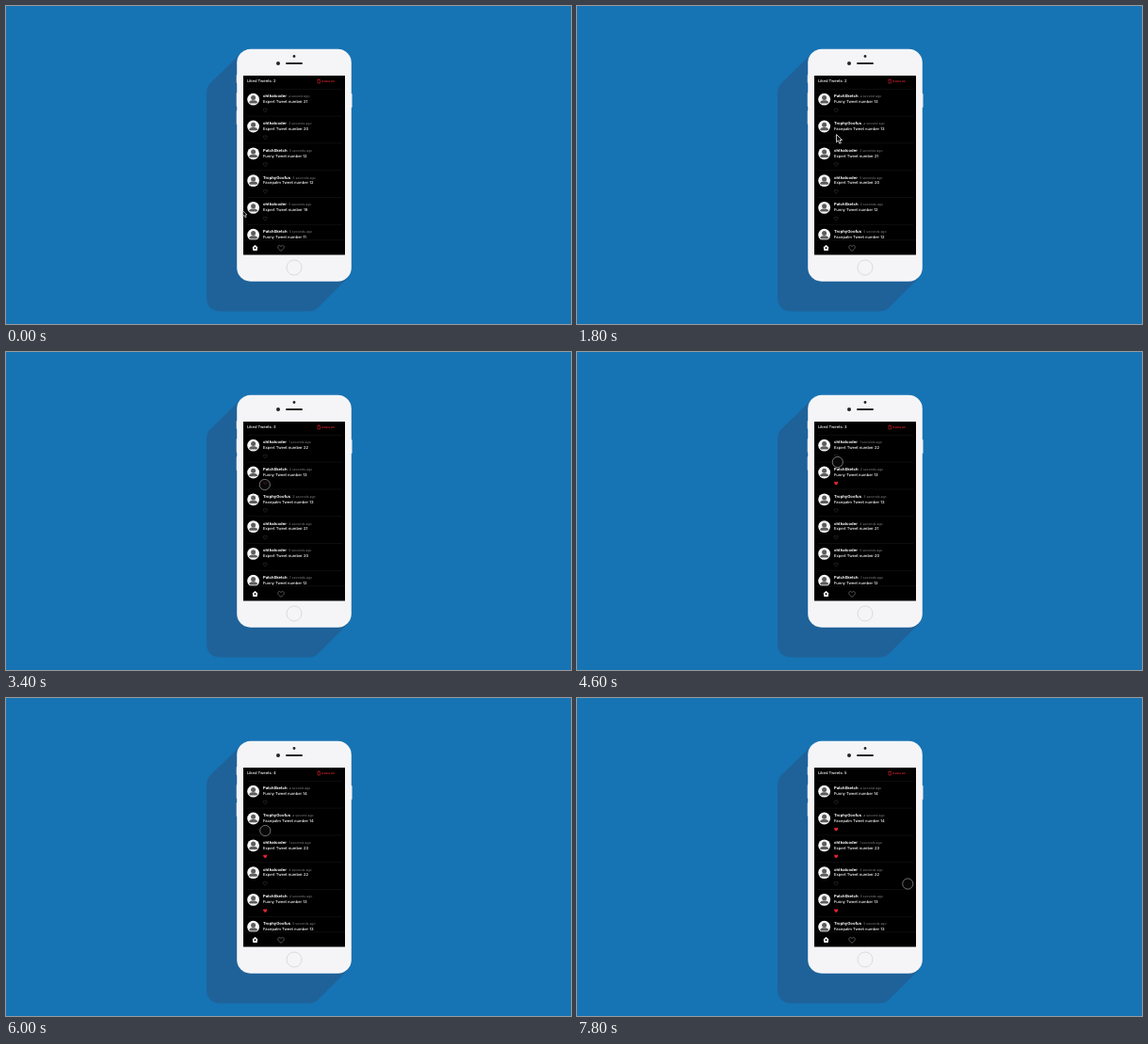
Recreate the animation shown at these times as an HTML page. Size 600 px wide and 338 px high, loop 8 s.

```html
<!DOCTYPE html>
<html lang="en">
<head>
<meta charset="utf-8">
<title>Liked feed on a phone</title>
<style>
  html, body { margin: 0; width: 100%; height: 100%; overflow: hidden; background: #1673b4; }
  svg { display: block; width: 100%; height: 100%; }
  text { font-family: Inter, Roboto, sans-serif; font-size: 4.1px; font-weight: 500; fill: #fff; text-rendering: geometricPrecision; }
  .name { font-weight: 700; font-size: 4.15px; }
  .age { font-weight: 400; font-size: 3.5px; fill: #808080; }
  .delete { font-size: 2.9px; font-weight: 600; fill: #e0242f; }
  .line { stroke: #1c1c1c; stroke-width: .5; }
  .heart { fill: none; stroke: #4c4c4c; stroke-width: .5; }
  .heart.liked { fill: #e0242f; stroke: none; }
</style>
</head>
<body>
<svg viewBox="0 0 600 338">
  <defs>
    <path id="heart" d="M0 2.2C-1.2 1.3 -2.3 .4 -2.3 -.7C-2.3 -2.3 -.6 -2.5 0 -1.2C.6 -2.5 2.3 -2.3 2.3 -.7C2.3 .4 1.2 1.3 0 2.2Z"/>
    <clipPath id="face"><circle r="5.6"/></clipPath>
    <g id="avatar">
      <circle r="6.4" fill="#f5f5f5"/>
      <g clip-path="url(#face)" fill="#5c5c5c">
        <circle cy="-1.7" r="2.5"/>
        <path d="M-4.500 4.200V3.200Q-4.200 1.200 -1.600 1H1.600Q4.200 1.200 4.500 3.200V4.200Z"/>
      </g>
    </g>
    <clipPath id="feedArea"><rect x="252" y="88" width="108" height="160.500"/></clipPath>
    <clipPath id="screenArea"><rect x="252" y="74" width="108" height="190.500"/></clipPath>
  </defs>

  <rect width="600" height="338" fill="#1673b4"/>
  <path fill="#1f6299" d="M250 50L217 82Q213 86 213 93V309Q213 324.500 228 324.500H321Q327 324.500 331 321L363 289Z"/>

  <g fill="#dfe2e6">
    <rect x="244.700" y="73" width="2" height="9" rx=".7"/>
    <rect x="244.700" y="92" width="2" height="15" rx=".7"/>
    <rect x="244.700" y="111" width="2" height="15" rx=".7"/>
    <rect x="365.600" y="93" width="2" height="15" rx=".7"/>
  </g>
  <rect x="245.200" y="45.800" width="121.600" height="246.900" rx="14.500" fill="#f5f5f7"/>
  <g fill="#242424">
    <circle cx="306" cy="53.500" r="1.400"/>
    <circle cx="289" cy="61" r="2"/>
    <rect x="297" y="60" width="18" height="2" rx="1"/>
  </g>
  <circle cx="306" cy="278" r="8" fill="#f5f5f7" stroke="#d9d9dc" stroke-width=".9"/>
  <rect x="252" y="74" width="108" height="190.500"/>

  <text id="total" x="256" y="81.400"></text>
  <path fill="none" stroke="#e0242f" stroke-width=".6" d="M330.500 78.400H333.900M331 78.700V82H333.400V78.700M331.600 77.700H332.800"/>
  <text class="delete" x="335.300" y="81.100">Delete All</text>
  <path class="line" d="M256 88.300H357"/>

  <g id="feed" clip-path="url(#feedArea)"></g>

  <path class="line" d="M252 248.800H360"/>
  <path fill="#fff" d="M264.500 254L267.200 256.200L266.700 260H262.300L261.800 256.200Z"/>
  <circle cx="264.500" cy="257.300" r="1"/>
  <use href="#heart" class="heart" transform="translate(292 257.300) scale(1.400)" style="stroke:#777"/>

  <path id="arrow" d="M0 0V8.300L1.900 6.600L3.300 9.700L4.900 9L3.500 6H6Z" fill="#111" stroke="#eee" stroke-width=".8"/>
  <circle id="touch" r="5.600" fill="#080808" fill-opacity=".85" stroke="#8c8c8c" stroke-width=".8" clip-path="none"/>
</svg>

<script>
const LOOP = 8000, STEP = 200, ROWS = 6, PITCH = 28.8;
const authors = { Funny: "PatchSketch", Facepalm: "TrophyGoofus", Expert: "ohthatcoder" };

// Newest first; each state shows six posts from its offset.
const posts = ["Funny 14", "Facepalm 14", "Expert 23", "Expert 22", "Funny 13", "Facepalm 13",
  "Expert 21", "Expert 20", "Funny 12", "Facepalm 12", "Expert 19", "Funny 11"];
const likes = { "Funny 13": 3200, "Expert 23": 5200, "Facepalm 14": 6600 };

// Start time, offset into posts, age of each row in seconds
const states = [
  [0, 6, "a23355"],
  [800, 5, "a13455"],
  [1600, 4, "aa2555"],
  [2200, 3, "aa1356"],
  [3200, 3, "123457"],
  [4800, 2, "a34568"],
  [5400, 1, "aa3457"],
  [5800, 0, "aa1445"],
  [6600, 0, "aa1455"]
];

// Time, x, y of the pointer
const path = [
  [0, 251.5, 217.5], [400, 251.5, 217.5], [1400, 275, 137], [1800, 275.5, 136.5],
  [2000, 275.3, 142], [2400, 275.3, 143], [3400, 274.8, 141], [3800, 274.8, 141],
  [4600, 276.8, 117], [5000, 275, 111], [5400, 275, 112], [5800, 275.3, 141],
  [7000, 275.3, 141], [7800, 351.3, 197.5]
];
const TOUCH_FROM = 2000;

const byId = id => document.getElementById(id);
const lastBefore = (table, t) => table.filter(row => row[0] <= t).pop();

function pointerAt(t) {
  const a = lastBefore(path, t);
  const b = path[path.indexOf(a) + 1] || a;
  const k = b === a ? 0 : (t - a[0]) / (b[0] - a[0]);
  const eased = k * k * (3 - 2 * k);
  return [1, 2].map(i => a[i] + (b[i] - a[i]) * eased);
}

function row(post, age, index, t) {
  const [kind, number] = post.split(" ");
  const liked = t >= likes[post] ? " liked" : "";
  const ago = age === "a" ? "a second ago" : `${age} seconds ago`;
  return `<g transform="translate(0 ${index * PITCH})">
    <use href="#avatar" x="262.6" y="99.2"/>
    <text class="name" x="273" y="97.2">${authors[kind]}<tspan class="age" dx="2.3">${ago}</tspan></text>
    <text x="273" y="103.1">${kind} Tweet number ${number}</text>
    <use href="#heart" class="heart${liked}" transform="translate(275.2 110.8) scale(.88)"/>
    <path class="line" d="M256 117.1H357"/>
  </g>`;
}

function draw(t) {
  const [, offset, ages] = lastBefore(states, t);
  const visible = posts.slice(offset, offset + ROWS);
  byId("feed").innerHTML = visible.map((post, i) => row(post, ages[i], i, t)).join("");
  const total = 2 + Object.values(likes).filter(time => time <= t).length;
  byId("total").textContent = `Liked Tweets: ${total}`;

  const touching = t >= TOUCH_FROM;
  const place = `translate(${pointerAt(t)})`;
  byId("arrow").setAttribute("transform", t < 600 ? `${place} scale(.75)` : place);
  byId("touch").setAttribute("transform", place);
  byId("arrow").style.display = touching ? "none" : "";
  byId("touch").style.display = touching ? "" : "none";
}

const start = performance.now();
let shown = -1;
function tick() {
  const elapsed = Math.max(0, performance.now() - start) % LOOP;
  const t = Math.floor(elapsed / STEP) * STEP;
  if (t !== shown) draw(shown = t);
  requestAnimationFrame(tick);
}
tick();
</script>
</body>
</html>
```
